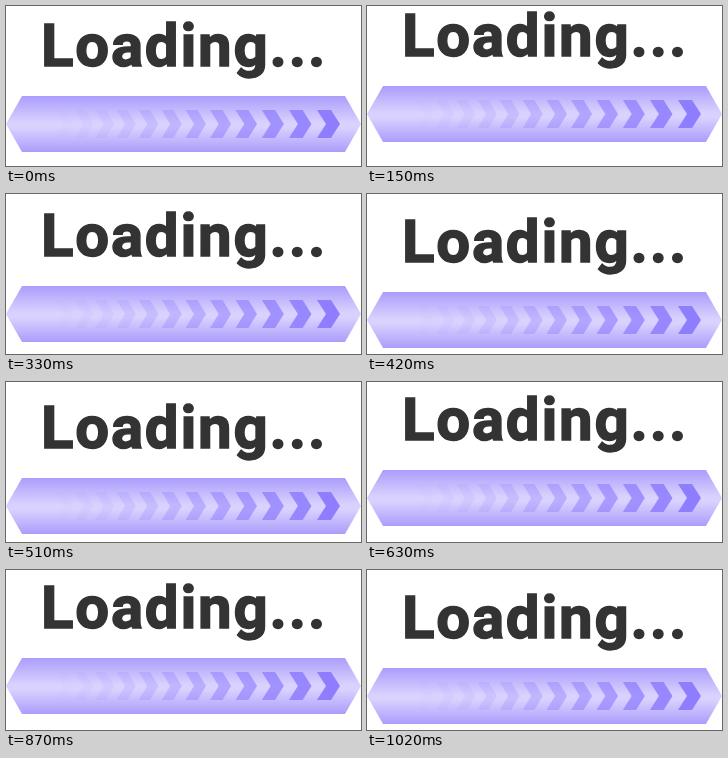
An HTML page that plays this animation: 355x160 px, repeating every 1050 ms.

```html
<!DOCTYPE html>
<html lang="en">
<head>
<meta charset="utf-8">
<title>Loading</title>
<style>
  html, body { margin: 0; width: 100%; height: 100%; overflow: hidden; background: #fff; }
  svg { display: block; width: 355px; height: 160px; }
  text {
    font: 700 60px Roboto, "Open Sans", sans-serif;
    letter-spacing: 1.75px;
    fill: #333;
    stroke: #333;
    stroke-width: 1.4px;
  }
</style>
</head>
<body>
<svg viewBox="0 0 355 160">
  <defs>
    <linearGradient id="shine" x2="0" y2="1">
      <stop offset="0" stop-color="#ab9dfc"/>
      <stop offset=".48" stop-color="#d9d2fe"/>
      <stop offset=".56" stop-color="#d9d2fe"/>
      <stop offset="1" stop-color="#ab9dfc"/>
    </linearGradient>
  </defs>
  <g id="loader">
    <text x="35" y="59.5">Loading...</text>
    <path fill="url(#shine)" d="M0 118 16 90H339L355 118 339 146H16Z"/>
    <g id="arrows" fill="#8e7dff"></g>
  </g>
</svg>
<script>
  const LOOP = 1050, FRAME = 30, BOUNCE = 600, HEIGHT = 10, ARROWS = 12;
  const loader = document.getElementById('loader');
  const arrows = document.getElementById('arrows');

  // Arrows fade and crowd together toward the left.
  for (let i = 0, x = 311; i < ARROWS; i++) {
    const arrow = document.createElementNS('http://www.w3.org/2000/svg', 'path');
    const w = 14 - i * .4, tip = 9 - i * .1;
    arrow.setAttribute('d', `M${x} 104h${w}l${tip} 14 ${-tip} 14h${-w}l${tip} -14z`);
    arrow.setAttribute('opacity', (1 - i / ARROWS) ** 1.6);
    arrows.append(arrow);
    x -= 28 - i * .85;
  }

  // Triangle wave: up, down, and back to the middle.
  function offset(t) {
    const phase = (t / BOUNCE + .25) % 1;
    return HEIGHT * (4 * Math.abs(phase - .5) - 1);
  }

  function draw(now) {
    const t = Math.floor(now % LOOP / FRAME) * FRAME;
    loader.setAttribute('transform', `translate(0 ${offset(t)})`);
    requestAnimationFrame(draw);
  }
  draw(performance.now());
</script>
</body>
</html>
```
